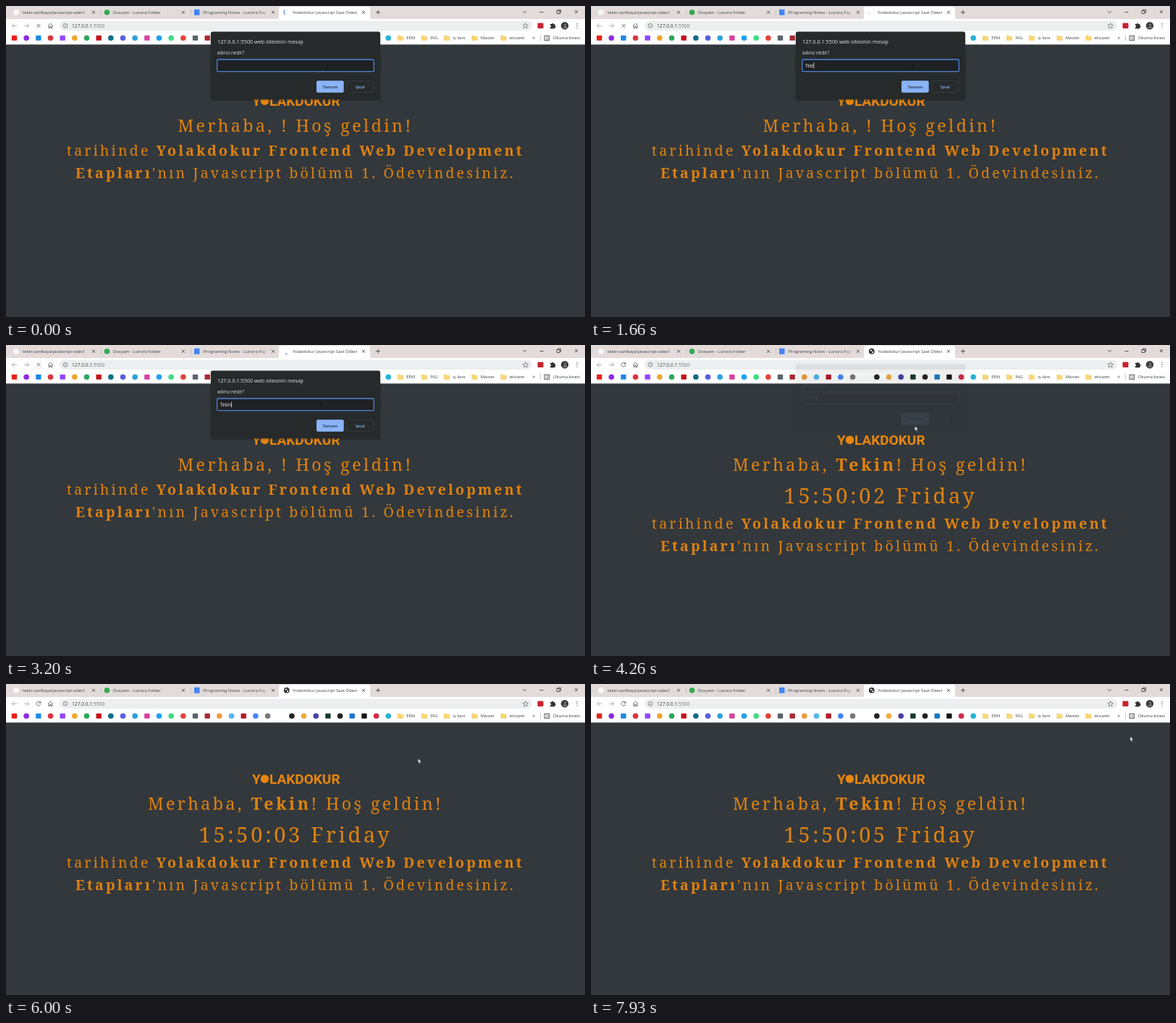
An HTML page for the animation above (8 s loop, 800 by 430 pixels).

```html
<!DOCTYPE html>
<html lang="tr">
<head>
<meta charset="utf-8">
<title>Saat Ödevi</title>
<style>
  html, body { margin: 0; width: 100%; height: 100%; overflow: hidden; background: #33383c; }
  svg { display: block; width: 800px; height: 430px; }
  text { white-space: pre; }
  .ui { font-family: "Open Sans", "Noto Sans", sans-serif; font-size: 5.9px; fill: #3c4043; }
  .line { fill: none; stroke: #5f6368; stroke-width: .9; }
  .dark { stroke: #333; stroke-width: .8; }
  .page { font-family: "Noto Serif", serif; fill: #df820f; text-anchor: middle; }
  .hello { font-size: 23.2px; letter-spacing: 3.4px; }
  .clock { font-size: 29px; letter-spacing: 3.7px; }
  .intro { font-size: 19.5px; letter-spacing: 3.17px; }
  .page tspan { font-weight: 700; }
  .brand { font: 700 19px Roboto, sans-serif; fill: #e8860e; }

  .before, .after, .intro, .beam, .arrow { animation: 8s step-end infinite; }
  .before { animation-name: before; }
  .after { animation-name: after; }
  .intro { animation-name: drop; }
  .beam { animation-name: beam; }
  .arrow { animation-name: arrow; }
  .dialog { animation: dismiss 8s linear infinite; }
  .mouse { animation: travel 8s ease-in-out infinite; }
  @keyframes before { 0% { opacity: 1 } 51%, 100% { opacity: 0 } }
  @keyframes after { 0% { opacity: 0 } 51%, 100% { opacity: 1 } }
  @keyframes drop { 0% { transform: none } 51%, 100% { transform: translateY(47px) } }
  @keyframes beam { 0% { opacity: 1 } 45%, 100% { opacity: 0 } }
  @keyframes arrow { 0% { opacity: 0 } 45%, 100% { opacity: 1 } }
  @keyframes dismiss {
    0%, 51% { opacity: 1; transform: none }
    53.45%, 100% { opacity: 0; transform: translateY(-10px) }
  }
  @keyframes travel {
    0%, 32% { transform: translate(444px, 84px) }
    38%, 42% { transform: translate(436px, 80px) }
    48%, 70% { transform: translate(447.5px, 112px) }
    81%, 88% { transform: translate(735px, 90.5px) }
    97%, 100% { transform: translate(745px, 72.5px) }
  }
</style>
</head>
<body>
<svg viewBox="0 0 800 430" xmlns="http://www.w3.org/2000/svg">
  <defs>
    <linearGradient id="fade" gradientUnits="userSpaceOnUse" x1="350" x2="363" y1="0" y2="0">
      <stop stop-color="#3c4043"/><stop offset="1" stop-color="#3c4043" stop-opacity="0"/>
    </linearGradient>
    <filter id="shadow" x="-10%" y="-10%" width="120%" height="130%">
      <feDropShadow dx="0" dy="1" stdDeviation="1.5" flood-opacity=".4"/>
    </filter>
    <path id="x" d="M-2-2L2 2M2-2L-2 2"/>
    <path id="folder" d="M-3.7-3.2h2.8l.9 1h3.7v5.4h-7.4z" fill="#f8d775" stroke="#e9bd4f" stroke-width=".4"/>
  </defs>

  <rect width="800" height="430" fill="#33383c"/>

  <g class="page">
    <text class="hello before" x="400" y="174">Merhaba, ! Hoş geldin!</text>
    <g class="after">
      <text class="hello" x="400" y="174">Merhaba, <tspan>Tekin</tspan>! Hoş geldin!</text>
      <text class="clock" id="clock" x="400" y="218.5">15:50:02 Friday</text>
    </g>
    <g class="intro">
      <text x="400" y="207">tarihinde <tspan>Yolakdokur Frontend Web Development</tspan></text>
      <text x="400" y="238"><tspan>Etapları</tspan>'nın Javascript bölümü 1. Ödevindesiniz.</text>
    </g>
  </g>
  <g class="brand">
    <text x="340" y="138">Y</text>
    <circle cx="357.5" cy="131.2" r="5.8"/>
    <text x="364" y="138">LAKDOKUR</text>
  </g>

  <g class="ui">
    <rect width="800" height="19" fill="#e2dbda"/>
    <path d="M374 18.5q3 0 3-3V4q0-3 3-3h120q3 0 3 3v11.5q0 3 3 3z" fill="#fff"/>
    <rect y="18" width="800" height="35.3" fill="#fff"/>

    <circle cx="14" cy="8.7" r="4" fill="#f7f5f5"/>
    <text x="23" y="10.7">tekin-sarilkaya/javascript-odev1</text>
    <circle cx="139.5" cy="8.7" r="3.8" fill="#34a853"/>
    <text x="148" y="10.7">Dosyam - Lunora Folder</text>
    <rect x="260" y="4.7" width="7.5" height="8" fill="#4285f4"/>
    <text x="272" y="10.7" fill="url(#fade)">!Programing Notes - Lunora Pag</text>
    <text x="396" y="10.7">Yolakdokur Javascript Saat Ödevi</text>
    <g class="line dark">
      <use href="#x" x="121" y="8.7"/><use href="#x" x="245" y="8.7"/>
      <use href="#x" x="369" y="8.7"/><use href="#x" x="494" y="8.7"/>
      <path d="M511 8.7h6M514 5.7v6M714 7l2.5 2.5L719 7M737.500 8.500h5M761 6.500h4v4h-4zM762.500 6.500v-1.300h4v4h-1.500"/>
      <use href="#x" x="788" y="8"/>
      <path d="M131.500 5v8M255.500 5v8" stroke="#aaa" stroke-width=".5"/>
    </g>
    <path class="before" id="spinner" fill="none" stroke="#3b78e7" stroke-width="1.1"/>
    <g class="after">
      <circle cx="387.8" cy="8.7" r="3.9" fill="#333"/>
      <path d="M385.300 7.300l2.400-.9 1 1.200-1.800 1.200zM388.200 9.500l2.200-.7-.8 2.200-1.400.5z" fill="#fff"/>
    </g>

    <rect x="74" y="20.5" width="653" height="13.5" rx="6.7" fill="#eceeef"/>
    <g class="line">
      <path d="M15 27.300H8.500M11.500 24.200l-3.100 3.100 3.100 3.100M25 27.300h6.500M28.500 24.200l3.100 3.100-3.100 3.100" stroke="#a5a5a5"/>
      <path d="M58 27.500l3.500-3.300 3.500 3.300M59 27v3.500h1.800v-2.300h1.400v2.300H64V27"/>
      <g stroke-width=".7">
        <circle cx="82" cy="27.3" r="2.9"/>
        <path d="M82 26.900v2M82 25.400v.7"/>
        <path d="M717.800 23.700l1.100 2.500 2.600.2-2 1.800.6 2.600-2.300-1.400-2.300 1.400.6-2.600-2-1.800 2.600-.2z"/>
      </g>
      <path class="before" d="M42.500 24.800l5 5M47.500 24.800l-5 5"/>
    </g>
    <g class="after">
      <path class="line" d="M47.300 25.500a2.900 2.900 0 1 0 .4 2.500"/>
      <path d="M48.300 23.800v3h-3z" fill="#5f6368"/>
    </g>
    <text x="91" y="29.7" font-size="6.7">127.0.0.1<tspan fill="#777">:5500</tspan></text>
    <rect x="734.5" y="23.5" width="8" height="7.5" rx="1" fill="#c8222f"/>
    <path d="M752 25h2a1.200 1.200 0 0 1 2.400 0h2v2a1.200 1.200 0 0 1 0 2.400v1.800H752v-2a1.200 1.200 0 0 0 0-2.400z" fill="#333"/>
    <circle cx="772" cy="27.3" r="5.2" fill="#3b3b3d"/>
    <circle cx="772.5" cy="26" r="1.7" fill="#77716e"/>
    <path d="M769.500 31a3 3 0 0 1 6 0z" fill="#77716e"/>
    <g fill="#555"><circle cx="789" cy="24.5" r=".7"/><circle cx="789" cy="27.3" r=".7"/><circle cx="789" cy="30.1" r=".7"/></g>

    <g id="marks"></g>
    <text x="727.5" y="46.3" font-size="7">»</text>
    <path class="line" d="M738.500 39.500v9" stroke-opacity=".4"/>
    <path class="line dark" d="M744 41h6.500v6.500H744zM745.300 43h1M747 43h2.300M745.300 45.500h1M747 45.500h2.300"/>
    <text x="756" y="46.3">Okuma listesi</text>
  </g>

  <g class="dialog ui">
    <rect x="283" y="35.5" width="234" height="93.5" rx="2.5" fill="#27292b" filter="url(#shadow)"/>
    <text x="292" y="52" font-size="7.25" fill="#e8eaed">127.0.0.1:5500 web sitesinin mesajı</text>
    <text x="292" y="67" font-size="6.3" fill="#e0e2e5">adınız nedir?</text>
    <rect x="291.7" y="74" width="216.6" height="16.7" rx="1.5" fill="#202124" stroke="#4b86dc" stroke-width="1.3"/>
    <text id="typed" x="296" y="84.6" font-size="6.2" fill="#f1f3f4"></text>
    <rect id="caret" y="78.3" width=".7" height="8" fill="#fff"/>
    <rect x="429" y="103.3" width="37.7" height="16.5" rx="2" fill="#8ab4f8"/>
    <rect x="470.8" y="103.6" width="37.3" height="16" rx="2" fill="none" stroke="#3f4347" stroke-width=".7"/>
    <g text-anchor="middle" font-weight="600">
      <text x="447.8" y="113.6" fill="#202b40">Tamam</text>
      <text x="489.3" y="113.6" fill="#8ab4f8">İptal</text>
    </g>
  </g>

  <g class="mouse">
    <path class="beam" d="M-1-3h2M0-3v6M-1 3h2" stroke="#0c0c0d" stroke-width=".6"/>
    <path class="arrow" d="M0 0v6.500l1.500-1.300 1.100 2.500 1-.5-1.100-2.400h2z" fill="#fff" stroke="#111" stroke-width=".4"/>
  </g>
</svg>
<script>
  const byId = id => document.getElementById(id);
  const LOOP = 8000, SUBMIT = 4080, NAME = "Tekin";
  const KEY_TIMES = [1260, 1400, 1530, 1650, 1800];

  function add(parent, tag, attrs, content = "") {
    const el = document.createElementNS("http://www.w3.org/2000/svg", tag);
    for (const key in attrs) el.setAttribute(key, attrs[key]);
    el.textContent = content;
    return parent.appendChild(el);
  }

  // Bookmark bar: evenly spaced marks, "s" for square and "c" for circle
  const marks = byId("marks");
  ("s#e62117 c#8a2be2 s#1e88e5 c#d9363e s#9146ff c#f0a52b c#2da65a s#c4111c c#116d86 " +
   "c#5b5ee0 c#2aa1da s#d6409f c#1da1f2 c#3ddc84 c#e0453a s#59636b s#a62a32 c#ee9a3a " +
   "c#52b7ea s#b7182c c#4285f4 c#777777 - c#222222 c#f2a93b c#4a3fa5 s#16372f c#222222 " +
   "s#1877c9 s#161616 c#d52945 c#24b5d6").split(" ").forEach((mark, i) => {
    const x = 11.5 + i * 16.67, fill = mark.slice(1);
    if (mark[0] === "s") add(marks, "rect", { x: x - 3.7, y: 40.7, width: 7.4, height: 7, rx: 1, fill });
    if (mark[0] === "c") add(marks, "circle", { cx: x, cy: 44.2, r: 3.8, fill });
  });
  [[545, "EEM"], [578, "İNG"], [609, "iş ilanı"], [647.5, "Master"], [687.5, "eticaret"]].forEach(([x, label]) => {
    add(marks, "use", { href: "#folder", x, y: 44.2 });
    add(marks, "text", { x: x + 8.3, y: 46.3 }, label);
  });

  const typed = byId("typed"), caret = byId("caret"), clock = byId("clock"), spinner = byId("spinner");

  // Arc that alternately shrinks and grows while turning
  function spinnerPath(t) {
    const u = t / 666 + .38, k = Math.floor(u), x = u - k;
    const sweep = 270 * x * x / (x * x + .27 * (1 - x) ** 2);
    const base = 360 * t / 1568 - 35 + 270 * Math.ceil(k / 2);
    const [from, to] = k % 2 ? [base, base + sweep] : [base + sweep, base + 270];
    const point = deg => {
      const a = deg * Math.PI / 180;
      return `${387.5 + 3.6 * Math.cos(a)} ${8.7 + 3.6 * Math.sin(a)}`;
    };
    const start = Math.min(from, to - 15);
    return `M${point(start)}A3.6 3.6 0 ${to - start > 180 ? 1 : 0} 1 ${point(to)}`;
  }

  function draw(t) {
    const count = KEY_TIMES.filter(k => t >= k).length;
    const text = NAME.slice(0, count);
    if (typed.textContent !== text) typed.textContent = text;
    const since = count ? t - KEY_TIMES[count - 1] : t + 500;
    caret.setAttribute("opacity", since % 1000 < 500 ? 1 : 0);
    caret.setAttribute("x", 296.3 + (count ? typed.getComputedTextLength() : 0));

    const second = 2 + Math.max(0, Math.floor((t - SUBMIT) / 1000));
    const time = `15:50:0${second} Friday`;
    if (clock.textContent !== time) clock.textContent = time;
    if (t < SUBMIT) spinner.setAttribute("d", spinnerPath(t));
  }

  let start;
  function tick(now) {
    start ??= now;
    draw((now - start) % LOOP);
    requestAnimationFrame(tick);
  }
  draw(0);
  requestAnimationFrame(tick);
</script>
</body>
</html>
```
